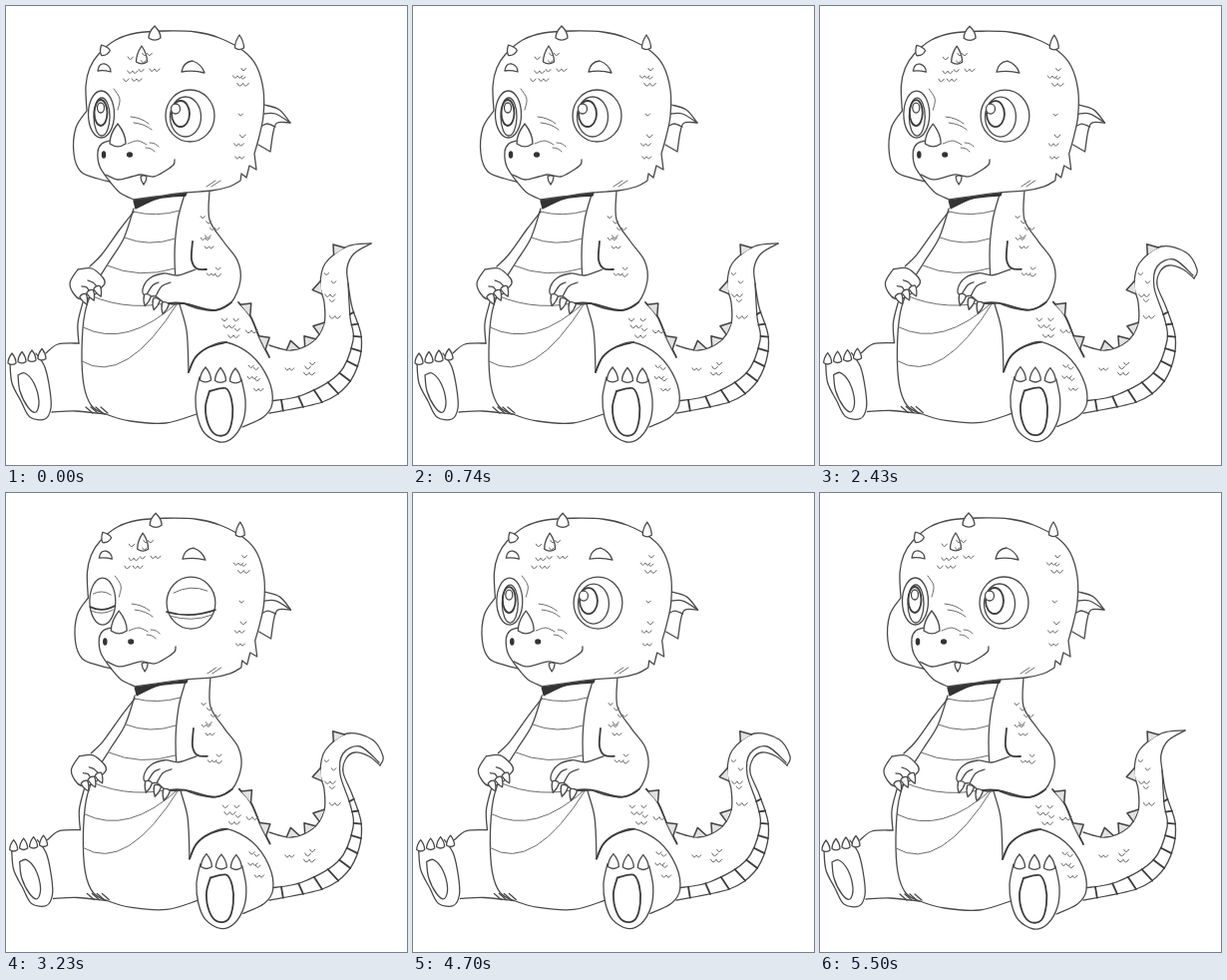
Recreate the animation shown at these times as an HTML page. Size 402 by 460 pixels, loop 6.73 s.

```html
<!DOCTYPE html>
<html lang="en">
<head>
<meta charset="utf-8">
<title>Little dragon</title>
<style>
html, body { margin: 0; width: 100%; height: 100%; overflow: hidden; background: #fff; }
svg { display: block; width: 100%; height: 100%; }
path, ellipse { fill: none; stroke: #4a4a4a; stroke-width: 1.3; stroke-linecap: round; stroke-linejoin: round; }
.solid { fill: #fff; }
.bold { stroke: #3c3c3c; stroke-width: 1.8; }
.thin { stroke: #6c6c6c; stroke-width: 1; }
.ink { fill: #333; stroke: #333; }
.spine { fill: #e2e2e2; stroke: #444; stroke-width: 1.5; }
</style>
</head>
<body>
<svg viewBox="0 0 402 460">
  <g id="tailUp"></g>
  <g id="tailCurl"></g>
  <g id="tailMarks"></g>
  <g id="dragon">
    <g id="body"></g>
    <g id="head"></g>
    <g id="open"></g>
    <g id="closed"></g>
  </g>
</svg>
<script>
const $ = id => document.getElementById(id);
const LOOP = 6730;
let layer;

function add(tag, cls, attrs) {
  const el = document.createElementNS("http://www.w3.org/2000/svg", tag);
  el.setAttribute("class", cls);
  for (const key in attrs) el.setAttribute(key, attrs[key]);
  layer.append(el);
  return el;
}

const path = (d, cls = "") => add("path", cls, { d });
const oval = (cx, cy, rx, ry, cls = "") => add("ellipse", cls, { cx, cy, rx, ry });

// Smooth curve through "x y x y ..."; a slash makes a sharp corner
function curve(text, cls) {
  let d = "", last;
  for (const piece of text.split("/")) {
    const n = piece.trim().split(/\s+/).map(Number);
    const p = last ? [last] : [];
    for (let i = 0; i < n.length; i += 2) p.push([n[i], n[i + 1]]);
    if (!last) d = "M" + p[0];
    for (let i = 0; i < p.length - 1; i++) {
      const a = p[i - 1] || p[i], b = p[i], c = p[i + 1], e = p[i + 2] || c;
      const out = b.map((v, k) => v + (c[k] - a[k]) / 6);
      const into = c.map((v, k) => v - (e[k] - b[k]) / 6);
      d += `C${out} ${into} ${c}`;
    }
    last = p.at(-1);
  }
  return path(d, cls);
}

// Pointed horn standing on (x, y)
function horn(x, y, w, h, turn = 0, cls = "solid") {
  const s = w / 2;
  path(`M${-s} 0Q${-s} ${-h * .5} 0 ${-h}Q${s} ${-h * .5} ${s} 0Q0 ${s * .7} ${-s} 0Z`, cls)
    .setAttribute("transform", `translate(${x} ${y}) rotate(${turn})`);
}

function claws(count, x, y, dx, dy, w, h, turn) {
  for (let i = 0; i < count; i++) horn(x + dx * i, y + dy * i, w, h, turn);
}

// Triangle on the left-hand side of a curve
function spine(line, at, base, height) {
  const a = line.getPointAtLength(at), b = line.getPointAtLength(at + base);
  const ux = (b.x - a.x) / base, uy = (b.y - a.y) / base;
  const tx = a.x + ux * base * .4 + uy * height;
  const ty = a.y + uy * base * .4 - ux * height;
  path(`M${a.x} ${a.y}L${tx} ${ty}L${b.x} ${b.y}`, "spine");
}

// Point where a falling curve reaches a height
function atY(line, y) {
  let lo = 0, hi = line.getTotalLength() * .6;
  for (let i = 0; i < 16; i++) {
    const mid = (lo + hi) / 2;
    if (line.getPointAtLength(mid).y < y) lo = mid; else hi = mid;
  }
  return line.getPointAtLength(lo);
}

let seed = 7;
function random() {
  seed = (seed * 16807) % 2147483647;
  return seed / 2147483647;
}

// Small scales spread evenly through an oval
function scales(count, cx, cy, rx, ry) {
  for (let i = 0; i < count; i++) {
    const angle = i * 2.4 + random(), r = Math.sqrt((i + .5) / count);
    const x = cx + rx * r * Math.cos(angle) - 4, y = cy + ry * r * Math.sin(angle);
    const w = 4 + random() * 2;
    path(`M${x} ${y}` + `q${w * .4} ${w} ${w} 0`.repeat(1 + i % 2), "thin");
  }
}

function tail(id, tip, inside, bandStart) {
  layer = $(id);
  const edge = curve("264 340 286 345 308 336 319 318 319 297 315 280 320 258 342 241 " + tip);
  const rim = curve(inside + " 347 302 356 330 354 356 342 380 317 397 264 408");
  const band = curve(bandStart + " 345 312 348 335 334 368 297 390 264 396");
  const fromEnd = (line, s) => line.getPointAtLength(line.getTotalLength() - s);
  for (let k = 0; k < 10; k++) {
    const s = 14 + 21 * k - .5 * k * k;
    const a = fromEnd(rim, s), b = fromEnd(band, s * .86);
    path(`M${a.x} ${a.y}L${b.x} ${b.y}`, "bold");
  }
  for (const at of [18, 37, 56, 98, 142]) spine(edge, at, 13, 9);
}

function buildTails() {
  tail("tailUp", "366 238", "366 238 349 248 342 262 343 278", "343 278");
  tail("tailCurl", "367 247 378 264 375 273", "375 273 364 264 350 260 341 266 338 280",
    "374 270 355 254 338 261 335 282");
  layer = $("tailMarks");
  scales(4, 296, 361, 22, 7);
  scales(5, 327, 288, 6, 28);
}

function buildBody() {
  layer = $("body");

  // Belly and its bands
  const left = curve("128 203 118 233 103 257 88 282 79 308 76 345 78 380 86 401 100 409 125 416 160 418 191 409");
  const right = curve("179 189 172 215 169 250 172 290 181 325 183 367");
  for (let i = 0; i < 6; i++) {
    const y = 206 + 25 * i + i * i;
    const a = atY(left, y), b = atY(right, y + 2 * i - 1);
    path(`M${a.x} ${a.y}Q${(a.x + b.x) / 2 - i} ${y + 6 + i * 4} ${b.x} ${b.y}`, "thin");
  }
  curve("128 195 150 190 181 187 / 180 190 / 152 193 130 203 / 128 195", "ink");
  curve("77 297 72 318 73 338");

  const back = curve("233 297 245 311 254 332 264 352", "bold");
  spine(back, 3, 15, 9);
  spine(back, 40, 15, 9);
  scales(6, 230, 321, 16, 12);

  // Left leg
  curve("73 338 52 339 40 348");
  curve("46 407 70 406 100 409");
  for (let i = 0; i < 4; i++) path(`M${80 + 5 * i} 402l7 6`);
  curve("4 358 6 378 15 396 24 412 39 414 45 403 44 385 39 362 30 348", "solid");
  curve("12 370 14 386 22 402 30 407 33 396 28 378 19 368 12 370");
  claws(4, 6, 358, 10, -1.5, 8, 10, 0);

  // Right leg
  curve("183 367 190 352 203 342 221 337 246 350 263 374 267 398 258 412 237 422", "solid");
  curve("183 367 190 352 203 342 221 337", "bold");
  scales(5, 251, 372, 9, 14);
  curve("194 372 190 392 192 412 199 428 214 437 228 432 238 415 240 395 236 374", "solid");
  curve("204 386 200 402 203 420 211 430 222 428 227 412 226 394 220 383 204 386", "bold");
  claws(3, 200, 375, 15, .5, 11, 13, 0);

  // Arms
  curve("128 206 114 224 96 249 84 261");
  curve("72 264 86 263 97 272 99 278 94 284 88 290 78 294 70 291 64 278 72 264", "solid");
  curve("92 282 87 277 82 275");
  curve("85 289 81 282 76 281");
  claws(3, 77, 290, 7, -4, 7, 10, 155);
  curve("204 185 204 214 218 236 232 255 235 275 226 297 209 305 192 303 178 298");
  curve("187 236 186 254 191 263 201 264", "bold");
  curve("190 264 172 270 158 268 144 273 137 284 140 291 150 291 158 297 168 299 178 298", "solid");
  curve("160 298 178 298 209 305 226 297", "bold");
  curve("141 289 147 280 153 277");
  curve("150 291 156 281 165 277");
  claws(3, 142, 290, 9, 4, 7, 11, 195);
  scales(6, 202, 226, 7, 20);
  scales(3, 211, 267, 8, 6);
}

function buildHead() {
  layer = $("head");
  curve("259 99 274 104 285 117 / 272 117 268 126 265 146 / 253 139", "solid");
  curve("258 108 270 108 285 117");
  curve("257 120 262 118 270 121");
  curve("81 105 80 80 84 62 93 48 110 34 131 27 160 25 190 26 214 32 238 45 251 60 258 84 258 110 254 130 249 148"
    + " / 251 164 / 244 160 / 241 172 / 236 168 / 235 175 / 224 181 206 185 180 187 150 191 128 194"
    + " / 114 187 104 176 / 92 173 75 166 68 148 70 122 81 105", "solid");

  horn(100, 47, 10, 9, -30);
  horn(149, 32, 12, 12);
  horn(136, 56, 11, 16);
  horn(234, 42, 9, 13);
  path("M92 65Q93 57 99 58Q105 60 105 66Q98 64 92 65ZM176 66Q178 56 187 55Q196 58 199 67Q188 64 176 66Z");

  // Muzzle
  curve("104 176 94 161 92 146 96 138 104 135");
  curve("100 169 112 174 126 171 135 169 148 171 160 165 168 159 169 154");
  horn(138, 171, 6, 8, 180);
  horn(112, 138, 16, 20);
  oval(98, 149, 1.6, 3, "ink");
  oval(124, 149, 2.4, 2, "ink");

  // Creases and scales
  curve("108 83 114 93 112 104", "thin");
  curve("122 138 132 135 141 139", "thin");
  for (let i = 0; i < 2; i++) {
    path(`M${125 + 3 * i} ${111 + 6 * i}q11 1 18 7`, "thin");
    path(`M${140 + 4 * i} ${142 - 5 * i}q6 0 9 4`, "thin");
    path(`M${201 + 5 * i} 181l9 -6`, "thin");
  }
  scales(8, 133, 62, 18, 17);
  scales(4, 237, 69, 9, 9);
  scales(4, 236, 128, 7, 26);

  oval(95.5, 108.5, 13, 23.5);
  oval(184.5, 110, 24.5, 26);

  layer = $("open");
  oval(96, 111, 8, 19);
  oval(95, 107, 6.5, 13, "bold");
  oval(95, 102, 3.5, 5, "solid");
  oval(180, 111, 15.5, 20);
  oval(175, 108, 9, 13, "bold");
  oval(170, 103, 4.5, 5, "solid");

  layer = $("closed");
  path("M83 114Q95 120 108 113M160 119Q184 126 209 117", "bold");
  path("M84 118Q95 123 106 117M86 101Q95 96 104 102M163 123Q185 130 206 122M167 100Q184 91 201 98", "thin");
}

function show(id, on) {
  $(id).setAttribute("visibility", on ? "visible" : "hidden");
}

function draw(now) {
  const t = now % LOOP;
  const curled = t >= 1230 && t < 5500;
  const blink = t >= 3230 && t < 3500;
  show("tailUp", !curled);
  show("tailCurl", curled);
  show("open", !blink);
  show("closed", blink);
  // The curled pose sits slightly narrower on the stage
  $("dragon").setAttribute("transform", curled ? "matrix(.996 0 0 .998 1.7 .3)" : "");
}

function tick() {
  draw(performance.now());
  requestAnimationFrame(tick);
}

buildTails();
buildBody();
buildHead();
tick();
</script>
</body>
</html>
```
